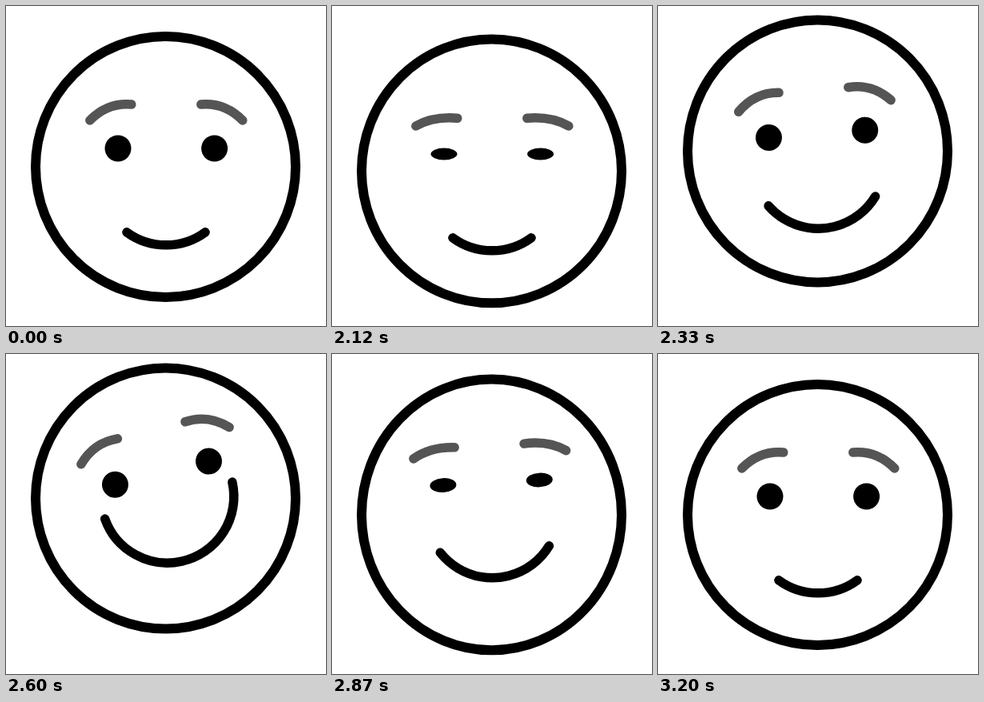
An HTML page with a canvas that plays this animation: 400 by 400 pixels, repeating every 3830 ms.

```html
<!DOCTYPE html>
<html>
<head>
<meta charset="utf-8">
<style>
html, body { margin: 0; overflow: hidden; background: #fff; }
canvas { display: block; }
</style>
</head>
<body>
<canvas id="stage" width="400" height="400"></canvas>
<script>
const ctx = document.getElementById('stage').getContext('2d');
const LOOP = 3830, START = 2030, END = 3200, STEP = 30;
const RAD = Math.PI / 180;

function smooth(u) {
  u = Math.min(1, Math.max(0, u));
  return u * u * (3 - 2 * u);
}

// The head looks up between two dips; its edges lead and the face follows.
function poseAt(t) {
  const ease = (from, to) => smooth((t - from) / (to - from));
  const hold = (rise, up, fall, down) => ease(rise, up) - ease(fall, down);
  const bump = (middle, reach) => smooth(1 - Math.abs(t - middle) / reach);
  return {
    top: 9 * bump(2085, 85) - 20.5 * hold(2085, 2255, 2745, 2960)
      + 6 * bump(2960, 130) - 2 * bump(3120, 80),
    bottom: 8 * bump(2140, 110) - 20.5 * hold(2165, 2368, 2690, 2885) + 7 * bump(2885, 105),
    lift: 8 * bump(2145, 115) - 30 * hold(2170, 2450, 2768, 2995) + 6.5 * bump(2995, 125),
    tilt: -14 * hold(2205, 2540, 2630, 2975),
    smile: 36.2 + 50.2 * hold(2158, 2588, 2612, 3056),
    open: 1 - 0.88 * (bump(2170, 120) + bump(2928, 120))
  };
}

function stroke(color, width, trace) {
  ctx.strokeStyle = color;
  ctx.lineWidth = width;
  ctx.beginPath();
  trace();
  ctx.stroke();
}

function drawHead(top, bottom) {
  const y0 = 38 + top, y1 = 364 + bottom;
  stroke('#000', 12, () => ctx.ellipse(199.5, (y0 + y1) / 2, 162.5, (y1 - y0) / 2, 0, 0, 7));
}

// Eye and brow, relative to the middle of the face; side is -1 or 1.
function drawEye(side, open) {
  const drop = 18.7 * (1 - open);
  ctx.beginPath();
  ctx.ellipse(side * 60.3, -22, 16.5, 16.5 * open, 0, 0, 7);
  ctx.fill();
  stroke('#555', 11.5, () => {
    ctx.moveTo(side * 95.5, -57);
    ctx.quadraticCurveTo(side * 73.5, -79.5 + drop, side * 43.5, -77 + drop);
  });
}

function draw(t) {
  const { top, bottom, lift, tilt, smile, open } = poseAt(t);

  ctx.fillStyle = '#fff';
  ctx.fillRect(0, 0, 400, 400);
  ctx.fillStyle = '#000';
  ctx.lineCap = 'round';
  drawHead(top, bottom);

  ctx.save();
  ctx.translate(200.3, 200 + lift);
  ctx.rotate(tilt * RAD);
  drawEye(-1, open);
  drawEye(1, open);
  ctx.restore();

  const down = 90 + tilt * 1.15;
  stroke('#000', 11.5, () => ctx.arc(200 - tilt * 0.13, 215.8 + lift + tilt * 0.55, 83,
    (down - smile) * RAD, (down + smile) * RAD));
}

function tick() {
  const t = performance.now() % LOOP;
  const moving = t >= START && t < END;
  draw(moving ? START + Math.floor((t - START) / STEP) * STEP : 0);
  requestAnimationFrame(tick);
}
tick();
</script>
</body>
</html>
```
